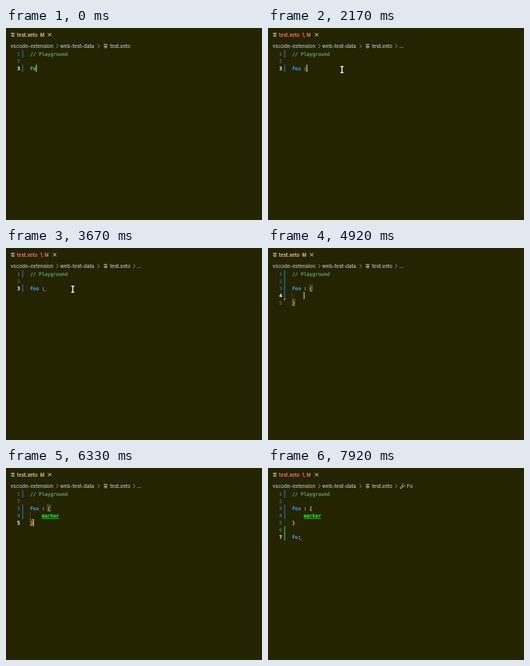
An HTML page with a canvas that plays this animation: 320 by 241 pixels, repeating every 8 s.

```html
<!DOCTYPE html>
<html lang="en">
<head>
<meta charset="utf-8">
<title>Editor</title>
<style>
  html, body { margin: 0; width: 100%; height: 100%; overflow: hidden; background: #242400; }
  canvas { display: block; width: 320px; height: 241px; }
</style>
</head>
<body>
<canvas id="stage" width="320" height="241"></canvas>
<script>
const ctx = document.getElementById('stage').getContext('2d');
const LOOP = 8000, LEFT = 30.2, CHAR = 3.61, ROW = 9;
const UI = '6.3px Inter, "Open Sans", sans-serif';
const SMALL = '5.7px Inter, "DejaVu Sans", sans-serif';
const MONO = '6px "DejaVu Sans Mono", "Liberation Mono", monospace';
const C = {
  bg: '#242400', comment: '#5f9f6c', blue: '#48a4ee', teal: '#30cdaa', text: '#e4e4e4',
  gold: '#ffd21c', green: '#24dd30', red: '#f87070', modified: '#e6c48e', crumb: '#a8a8b0',
  icon: '#c5c5c5', number: '#45697c', active: '#ffffff', changed: '#22659a', added: '#2ea85c',
  edge: '#38383c', select: '#064455'
};

// Typing: [time, text from line 3 on, caret line, caret column]
const body = 'Foo : {\n    marker\n}';
const keys = [
  [0, 'Fo', 3, 2], [80, 'Foo', 3, 3], [580, 'Foo ', 3, 4], [920, 'Foo :', 3, 5],
  [4170, 'Foo : ', 3, 6], [4330, 'Foo : {}', 3, 7], [4580, 'Foo : {\n    \n}', 4, 4],
  ...[...'marker'].map((_, i) =>
    [5080 + i * 120, `Foo : {\n    ${'marker'.slice(0, i + 1)}\n}`, 4, 5 + i]),
  [6250, body, 5, 1], [6500, body + '\n', 6, 0], [6670, body + '\n\n', 7, 0],
  [6920, body + '\n\nF', 7, 1], [7080, body + '\n\nFo', 7, 2], [7420, body + '\n\nFo:', 7, 3]
];

// Pointer path: [time, x, y]
const path = [[1830, 140, 52], [2500, 47.5, 52], [3600, 47.5, 52], [3670, 83.5, 51.5], [4080, 126, 60]];

const within = (t, a, b) => t >= a && t < b;
const rowTop = line => 28 + (line - 1) * ROW;
const colX = col => LEFT + col * CHAR;

function rect(x, y, w, h, color) {
  ctx.fillStyle = color;
  ctx.fillRect(x, y, w, h);
}

// A hairline outline gives small text a firmer weight.
function write(s, x, y, color, font = UI, align = 'left') {
  ctx.font = font;
  ctx.fillStyle = ctx.strokeStyle = color;
  ctx.lineWidth = 0.22;
  ctx.textAlign = align;
  ctx.fillText(s, x, y);
  ctx.strokeText(s, x, y);
}

function stroke(points, color, width = 0.8) {
  ctx.strokeStyle = color;
  ctx.lineWidth = width;
  ctx.beginPath();
  points.forEach(([x, y]) => ctx.lineTo(x, y));
  ctx.stroke();
}

function panel(x, y, w, h) {
  rect(x, y, w, h, C.edge);
  rect(x + 0.5, y + 0.5, w - 1, h - 1, C.bg);
}

function fileIcon(x, y) {
  [4.8, 3.4, 4.8, 3.4].forEach((w, i) => rect(x + (i % 2), y + i * 1.4, w, 0.75, C.icon));
}

function chevron(x) {
  stroke([[x, 20.2], [x + 2.3, 22.7], [x, 25.2]], C.crumb, 0.7);
}

function drawHeader(t) {
  const error = within(t, 1000, 4420) || t >= 7670;
  const color = error ? C.red : C.modified;
  fileIcon(6, 6);
  write('test.xeto', 13.8, 10.8, color);
  write(error ? '1, M' : 'M', 42.8, 10.8, color, SMALL);
  const x = error ? 58.8 : 52.6;
  stroke([[x, 6.4], [x + 4, 10.4]], '#fff');
  stroke([[x + 4, 6.4], [x, 10.4]], '#fff');

  write('vscode-extension', 5.8, 25, C.crumb);
  chevron(63);
  write('web-test-data', 67.8, 25, C.crumb);
  chevron(114.5);
  fileIcon(122, 20.3);
  write('test.xeto', 130, 25, C.crumb);
  if (t < 420) return;
  chevron(159);
  if (t < 7830) return write('...', 164, 25, C.crumb);
  stroke([[168, 22], [165, 25], [166, 26], [169, 23]], C.icon, 0.7);
  ctx.beginPath();
  ctx.arc(169.5, 21.6, 1.9, -0.2, 4.9);
  ctx.stroke();
  write('Fo', 173.8, 25, C.crumb);
}

function drawGutter(t, count, active) {
  for (let n = 1; n <= count; n++)
    write(n, 17.6, rowTop(n) + 6.8, n === active ? C.active : C.number, MONO, 'right');
  const bar = (from, to, color) =>
    rect(20.2, rowTop(from), 1.3, (to - from + 1) * ROW, color);
  if (within(t, 4830, 5500)) {
    bar(1, 4, C.changed);
    ctx.fillStyle = '#e04a3a';
    ctx.fill(new Path2D('M20 62.5 L22.3 64.5 L20 66.5Z'));
  } else {
    bar(1, 1, C.changed);
    bar(3, t < 5500 ? 3 : 4, C.changed);
  }
  if (t >= 6830) bar(6, 7, C.added);
}

function drawCode(t, lines, caretLine) {
  const matched = caretLine === 4 || caretLine === 5;
  write('// Playground', LEFT, rowTop(1) + 6.8, C.comment, MONO);
  if (matched) rect(30.2, rowTop(4), 0.6, ROW, '#494940');
  lines.forEach((line, i) => {
    const top = rowTop(i + 3), base = top + 6.8;
    for (const { 0: token, index } of line.matchAll(/\w+|[:{}]/g)) {
      const x = colX(index);
      if (/[{}]/.test(token)) {
        if (matched) {
          ctx.strokeStyle = '#85857a';
          ctx.lineWidth = 0.5;
          ctx.strokeRect(x, top + 0.5, CHAR, ROW - 1);
        }
        write(token, x, base, C.gold, MONO);
      } else if (token === 'marker' && t >= 5830) {
        write(token, x, base, C.green, 'bold ' + MONO);
        rect(x, top + 7.9, 6 * CHAR, 0.8, C.green);
      } else {
        const color = token === ':' ? C.text : t < 1000 ? C.teal : C.blue;
        write(token, x, base, color, MONO);
      }
    }
  });
  const squiggle = (x, y) =>
    stroke([[x, y], [x + 1, y - 1], [x + 2, y], [x + 3, y - 1]], '#f04858', 0.9);
  if (within(t, 1080, 4420)) squiggle(46.7, 54.3);
  if (t >= 7670) squiggle(39.6, 90.5);
}

function drawSuggestions(line, col, labels, right) {
  const left = colX(col) - 12, top = rowTop(line + 1);
  panel(left, top, right - left, labels.length * ROW + 1.5);
  labels.forEach((label, i) => {
    const y = top + 0.7 + i * ROW;
    if (!i) rect(left + 0.5, y, right - left - 1, ROW, C.select);
    rect(left + 3.5, y + 2.5, 4, 4, '#75beff');
    write(label, colX(col), y + 6.6, C.text, MONO);
  });
}

function drawProblem(t) {
  ctx.globalAlpha = Math.min(1, (t - 2730) / 260);
  panel(46, 21, 140, 25);
  write('Unexpected end of file', 50, 29.8, C.text, SMALL);
  rect(46, 34, 140, 0.5, C.edge);
  write('View Problem (⌥F8)', 51, 42.4, '#3794ff', SMALL);
  write('No quick fixes available', 183, 42.4, C.crumb, SMALL, 'right');
  ctx.globalAlpha = 1;
}

function drawPointer(t) {
  const i = path.findIndex(p => p[0] > t);
  const [a, b] = i > 0 ? [path[i - 1], path[i]] : [path.at(-1), path.at(-1)];
  const u = a === b ? 0 : (t - a[0]) / (b[0] - a[0]);
  const ease = u * u * (3 - 2 * u);
  const x = a[1] + (b[1] - a[1]) * ease, y = a[2] + (b[2] - a[2]) * ease;
  for (const [color, width] of [['#000', 2.6], ['#fff', 1.4]]) {
    stroke([[x - 2, y - 3.6], [x + 2, y - 3.6]], color, width);
    stroke([[x, y - 3.6], [x, y + 4]], color, width);
    stroke([[x - 2, y + 4], [x + 2, y + 4]], color, width);
  }
}

function draw(t) {
  const [typed, text, line, col] = keys.findLast(k => k[0] <= t);
  const lines = text.split('\n');
  rect(0, 0, 320, 241, C.bg);
  drawHeader(t);
  drawGutter(t, lines.length + 2, line);
  drawCode(t, lines, line);
  if ((t - typed) % 1000 < 500) rect(colX(col), rowTop(line), 0.9, ROW, '#d8e8d8');

  if (within(t, 5170, 5750)) drawSuggestions(4, 4, ['marker'], 264);
  if (within(t, 7000, 7500)) drawSuggestions(7, 0, t < 7170 ? ['Foo', 'Func'] : ['Foo'], 252);
  if (within(t, 2730, 3670)) drawProblem(t);
  if (within(t, 1830, 4170)) drawPointer(t);
}

const start = performance.now();
function tick() {
  draw((performance.now() - start) % LOOP);
  requestAnimationFrame(tick);
}
tick();
</script>
</body>
</html>
```
